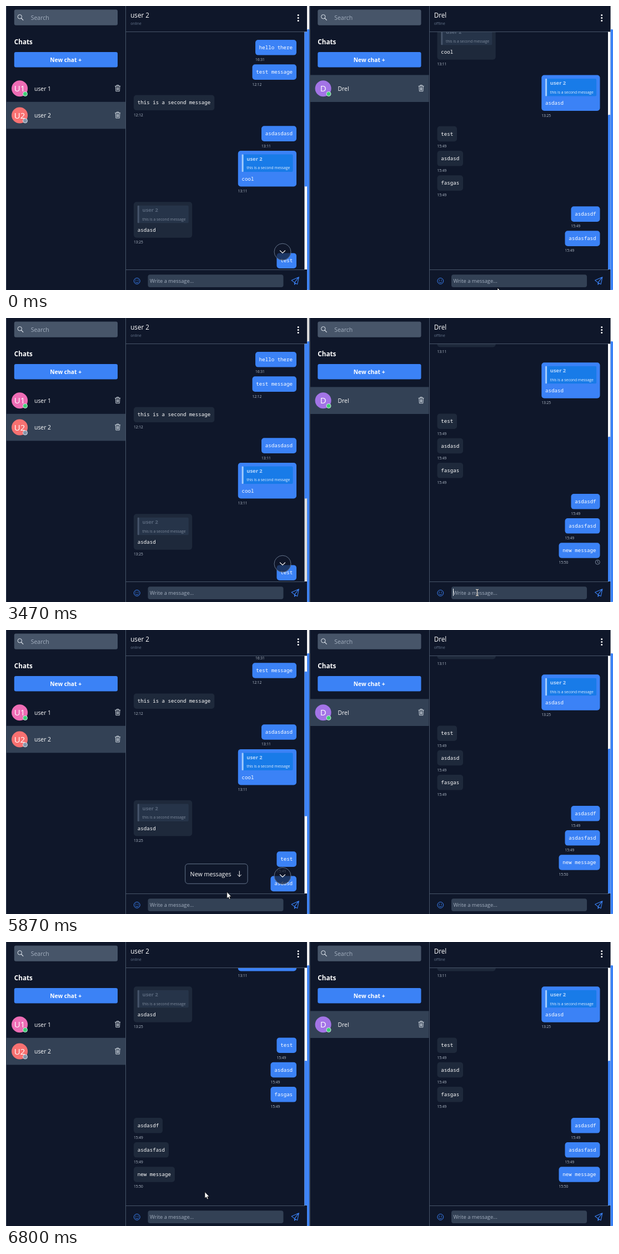
Recreate the animation shown at these times as an HTML page. Size 1093 by 512 pixels, loop 7790 ms.

```html
<!DOCTYPE html>
<html lang="en">
<head>
<meta charset="utf-8">
<title>Chat demo</title>
<style>
  html, body { margin: 0; width: 100%; height: 100%; overflow: hidden; background: #0f172a; }
  svg { display: block; font-family: "Open Sans", "Noto Sans", sans-serif; }
  text { white-space: pre; }
  .mono { font: 500 9.15px "Noto Sans Mono", "DejaVu Sans Mono", monospace; }
  .line { shape-rendering: crispEdges; }
  .icon { fill: none; stroke-linecap: round; stroke-linejoin: round; }
</style>
</head>
<body>
<svg id="stage" width="1093" height="512" viewBox="0 0 1093 512"></svg>
<script>
const LOOP = 7790;
const SHIFT = 546.5;
const VIEW = { top: 46.5, height: 428.5 };
const BG = '#0f172a', BLUE = '#3b82f6', SLATE = '#334155', EDGE = '#475569', MUTED = '#a3afbf';

// [top, sent from the left pane, text, time, has quote]
const MESSAGES = [
  [61, 1, 'hello there', '16:31'],
  [105.3, 1, 'test message', '12:12'],
  [160.5, 0, 'this is a second message', '12:12'],
  [216.3, 1, 'asdasdasd', '13:11'],
  [261, 1, 'cool', '13:11', 1],
  [353.2, 0, 'asdasd', '13:25', 1],
  [445.4, 1, 'test', '15:49'],
  [489.7, 1, 'asdasd', '15:49'],
  [534, 1, 'fasgas', '15:49'],
  [590, 0, 'asdasdf', '15:49'],
  [634, 0, 'asdasfasd', '15:49'],
  [678.2, 0, 'new message', '15:50']
];
const END = 273, STEP = 44.3;

const rect = (x, y, w, h, fill, r = 0, extra = '') =>
  `<rect x="${x}" y="${y}" width="${w}" height="${h}" rx="${r}" fill="${fill}" ${extra}/>`;
const circle = (x, y, r, fill, extra = '') =>
  `<circle cx="${x}" cy="${y}" r="${r}" fill="${fill}" ${extra}/>`;
const label = (x, y, size, fill, str, extra = '') =>
  `<text x="${x}" y="${y}" font-size="${size}" fill="${fill}" ${extra}>${str}</text>`;
const icon = (d, stroke, width = 1) =>
  `<path class="icon" d="${d}" stroke="${stroke}" stroke-width="${width}"/>`;
const group = (content, attrs) => `<g ${attrs}>${content}</g>`;

function quote(x, y, own) {
  const [bg, bar, name, text] = own
    ? ['#187be8', '#a5cdfd', '#b5d5fb', '#e3eefd']
    : ['#263449', '#46546a', '#58667b', '#7e8a9c'];
  return rect(x, y, 92, 31.5, bg, 2) + rect(x, y, 3, 31.5, bar, 1) +
    label(x + 8.7, y + 11.4, 9.4, name, 'user 2', 'font-weight="700"') +
    label(x + 8.7, y + 26.8, 6.8, text, 'this is a second message');
}

function bubble([y, sent, text, time, quoted], flip, last) {
  const own = !!sent !== flip;
  const w = quoted ? 105.2 : text.length * 5.49 + 13.6;
  const h = quoted ? 64.5 : 27.6;
  const x = own ? 523 - w : 230;
  return group(
    rect(x, y, w, h, own ? BLUE : '#1e293b', 5) +
    (quoted ? quote(x + 6.8, y + 6.5, own) : '') +
    `<text class="mono" x="${x + 6.8}" y="${y + h - 10.7}" fill="#fff">${text}</text>` +
    label(x, y + h + 10.6, 6.6, '#b3bdca', time), last ? 'class="fresh"' : '');
}

function userRow(i, name, initials, color, online, active) {
  const top = 124.4 + 48.4 * i, y = top + 24.3;
  return (active ? rect(.5, top, 214.5, 48.6, SLATE) : '') +
    circle(24.6, y, 14.5, color) +
    label(24.6, y + 5.5, 15, '#fff', initials, 'text-anchor="middle" font-weight="500"') +
    circle(34.5, y + 9.8, 4, online ? '#3ecf74' : '#8494a9', 'stroke="#e2e8f0" stroke-width=".9"') +
    label(51, y + 4.2, 10.4, '#fff', name) +
    icon(`M196.5 ${y - 4.3}h9.2M199.3 ${y - 4.5}v-1.5h3.6v1.5M197.3 ${y - 4}l.6 9h6.4l.6-9` +
      `M199.6 ${y - 2}l.2 5M202.6 ${y - 2}l-.2 5M201.1 ${y - 2}v5`, '#dbe2ea', .9);
}

function pane(id, title, users, flip) {
  const status = flip ? 'offline' : 'online';
  return group(
    rect(0, 0, 546.5, 512, BG) +
    rect(14.8, 6.4, 186.2, 28.4, EDGE, 3) +
    circle(24.8, 19.3, 3.7, 'none', 'stroke="#e2e8f0"') + icon('M27.6 22.1l3.2 3.2', '#e2e8f0', 1.2) +
    label(44.7, 24.7, 10.5, MUTED, 'Search') +
    label(14.8, 69.3, 11.7, '#fff', 'Chats', 'font-weight="700"') +
    rect(14.8, 83, 186.2, 27.5, BLUE, 3) +
    label(107.6, 101, 10.25, '#fff', 'New chat +', 'text-anchor="middle" font-weight="700"') +
    users.map((u, i) => userRow(i, ...u)).join('') +
    group(group(MESSAGES.map((m, i) => bubble(m, flip, i === MESSAGES.length - 1)).join(''),
      'class="list"'), 'clip-path="url(#view)"') +
    rect(215, 0, 1, 512, EDGE, 0, 'class="line"') + rect(0, 0, 1, 512, '#3b475a', 0, 'class="line"') +
    rect(216, 46, 322, 1, EDGE, 0, 'class="line"') + rect(216, 475, 322, 1, EDGE, 0, 'class="line"') +
    label(224.2, 21, 11.7, '#fff', title) +
    label(224.2, 34, 6.75, '#64748b', status, 'class="status"') +
    [16.4, 21.4, 26.4].map(y => circle(526.2, y, 1.5, '#fff')).join('') +
    circle(235.8, 495.8, 5.4, 'none', `stroke="${BLUE}"`) +
    circle(233.9, 494.4, .8, BLUE) + circle(237.7, 494.4, .8, BLUE) +
    icon('M233 497.3q2.8 3 5.6 0', BLUE, .9) +
    rect(255.5, 484.3, 244, 22.8, SLATE, 4) +
    label(259, 498.5, 9.35, MUTED, 'Write a message...', 'class="draft"') +
    icon('M514.2 494.6L527.4 488.7L524.6 501.6L519.5 498.6ZM527.2 488.9L519.5 498.6V502.2L521.6 499.9', BLUE, 1.1) +
    rect(537.5, VIEW.top, 4.6, VIEW.height, '#fff', 0, 'class="track"') +
    rect(537.5, VIEW.top, 4.6, 0, BLUE, 1.5, 'class="thumb"') +
    rect(542.1, 0, 4.4, 512, '#fff', 0, 'class="track"') +
    rect(542.1, 42, 4.4, 470, BLUE, 1.5),
    `id="${id}" transform="translate(${flip ? SHIFT : 0})"`);
}

const stage = document.getElementById('stage');
stage.innerHTML =
  `<clipPath id="view">${rect(216, VIEW.top, 330, VIEW.height, '#000')}</clipPath>` +
  pane('left', 'user 2', [
    ['user 1', 'U1', '#ee6db5', true, false],
    ['user 2', 'U2', '#f87171', false, true]
  ], false) +
  pane('right', 'Drel', [['Drel', 'D', '#a374e6', true, true]], true) +
  group(circle(1065.3, 440.2, 4, 'none', 'stroke="#94a3b8" stroke-width=".8"') +
    icon('M1065.3 437.8v2.6l1.6 1', '#94a3b8', .8), 'id="clock"') +
  group(circle(498, 443.2, 15, BG, 'fill-opacity=".7" stroke="#64748b"') +
    icon('M493.4 441l4.6 4.4l4.6-4.4', '#fff', 1.1), 'id="down"') +
  group(rect(322.7, 421.7, 112.4, 35.6, BG, 5, 'stroke="#64748b"') +
    label(331.6, 443.7, 10.7, '#fff', 'New messages') +
    icon('M420.3 434.7v9.6M417.1 441.2l3.2 3.2l3.2-3.2', '#fff', 1), 'id="popup"') +
  rect(805, 487.5, 1, 13.5, '#fff', 0, 'id="caret" class="line"') +
  group(
    `<path class="arrow" d="M0 0V11.6L2.6 9.2L4.4 13.2L6.3 12.4L4.6 8.5H8.1Z" fill="#fff" stroke="#000" stroke-width=".7"/>` +
    group(icon('M-2-5.6Q0-5.6 0-4.4Q0-5.6 2-5.6M0-4.4V4.6M-2 5.6Q0 5.6 0 4.6Q0 5.6 2 5.6', '#f1e6d6', 1.1), 'class="beam"') +
    `<path class="hand" d="M-1.2 .4Q0-1.2 1.2 .4V5L5 5.8Q6.6 6.2 6.4 8L5.4 13.8H-1.2L-4.2 9.2Q-4.4 7.6-2.8 7.8L-1.2 9Z" fill="#fff" stroke="#000" stroke-width=".8"/>`,
    'id="cursor"');

const $ = (sel) => stage.querySelector(sel);
const show = (el, on) => el.setAttribute('visibility', on ? 'visible' : 'hidden');
const parts = (id) => ({
  list: $(`#${id} .list`), thumb: $(`#${id} .thumb`), fresh: $(`#${id} .fresh`),
  status: $(`#${id} .status`), draft: $(`#${id} .draft`)
});
const left = parts('left'), right = parts('right');
const tracks = stage.querySelectorAll('#left .track');
const clock = $('#clock'), down = $('#down'), popup = $('#popup'), caret = $('#caret'), cursor = $('#cursor');
const shapes = ['arrow', 'beam', 'hand'].map(c => [c, $('#cursor .' + c)]);

const FOCUS = 330, SENT = 2730, RECEIVED = 3670, CLICK = 5730, ARRIVED = 6250;
const KEYS = [1200, 1270, 1330, 1400, 1530, 1530, 1600, 1800, 1870, 1930, 2000];
const CARET = [[FOCUS, 1000], [1200, 2530], [SENT, 3070], [3470, 4000], [4470, 5000], [5530, CLICK]];
const PATH = [
  [0, 885, 508], [70, 885, 508], [330, 851, 495], [3400, 851, 495], [3470, 848.5, 495],
  [4130, 499, 402], [4400, 499, 402], [4470, 495, 405], [5130, 355, 446], [5270, 355, 446],
  [5600, 385, 445], [CLICK, 385, 445], [6000, 409, 496], [6070, 409, 496], [6800, 358, 450.5], [LOOP, 358, 450.5]
];

const within = (t, a, b) => t >= a && t < b;
const smooth = (p) => p * p * (3 - 2 * p);
const clamp = (p) => Math.max(0, Math.min(1, p));

function pointer(t) {
  const i = PATH.findIndex((k, n) => n && t < k[0]);
  const [t0, x0, y0] = PATH[i - 1], [t1, x1, y1] = PATH[i];
  const p = smooth((t - t0) / (t1 - t0));
  return [x0 + (x1 - x0) * p, y0 + (y1 - y0) * p];
}

function scroll(p, pos, hasNew) {
  const max = hasNew ? END : END - STEP;
  const size = hasNew ? 261 : 279;
  p.list.setAttribute('transform', `translate(0 ${-pos})`);
  p.thumb.setAttribute('y', VIEW.top + pos / max * (VIEW.height - size));
  p.thumb.setAttribute('height', size);
  show(p.fresh, hasNew);
}

function draw(t) {
  const sent = t >= SENT, received = t >= RECEIVED;
  scroll(left, END * smooth(clamp((t - CLICK) / 540)), received);
  scroll(right, sent ? END : END - STEP, sent);
  show(clock, sent && !received);
  show(down, t < ARRIVED);
  const popupOn = within(t, RECEIVED, ARRIVED);
  show(popup, popupOn);

  const typing = within(t, 1270, 2530);
  left.status.textContent = typing ? 'user 2 is typing...' : 'online';
  left.status.setAttribute('fill', typing ? BLUE : '#64748b');
  const away = within(t, FOCUS, CLICK);
  tracks.forEach(el => el.setAttribute('fill', away ? '#dedede' : '#fff'));

  const count = sent ? 0 : KEYS.filter(k => t >= k).length;
  right.draft.textContent = count ? 'new message'.slice(0, count) : 'Write a message...';
  right.draft.setAttribute('fill', count ? '#fff' : MUTED);
  caret.setAttribute('x', Math.round(805 + (count ? right.draft.getComputedTextLength() : 0)));
  show(caret, CARET.some(([a, b]) => within(t, a, b)));

  const [x, y] = pointer(t);
  const inInput = within(y, 484, 507) && (within(x, 255, 500) || within(x, 802, 1046));
  const onPopup = popupOn && within(x, 322, 436) && within(y, 421, 458);
  const shape = inInput ? 'beam' : onPopup ? 'hand' : 'arrow';
  cursor.setAttribute('transform', `translate(${x} ${y})`);
  shapes.forEach(([name, el]) => show(el, name === shape));
}

const start = performance.now();
function tick() {
  draw((performance.now() - start) % LOOP);
  requestAnimationFrame(tick);
}
tick();
</script>
</body>
</html>
```
